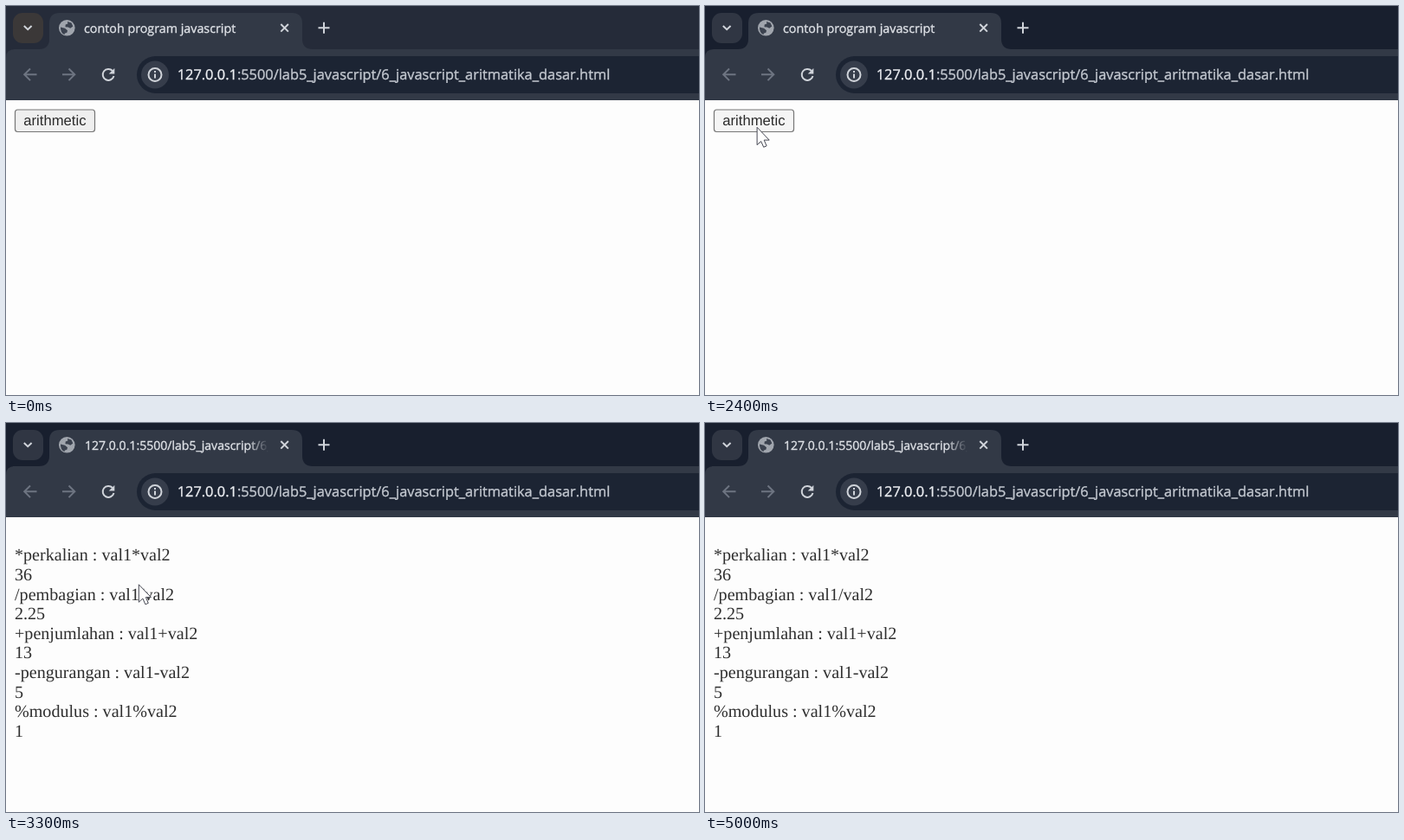
These frames come from a looping animation (800 px wide and 450 px high, 5100 ms). An HTML page:

```html
<!DOCTYPE html>
<html lang="id">
<head>
<meta charset="utf-8">
<title>contoh program javascript</title>
<style>
  html, body { margin: 0; width: 100%; height: 100%; overflow: hidden; background: #fdfdfd; }
  svg { display: block; width: 800px; height: 450px; }
  text { text-rendering: geometricPrecision; white-space: pre; }
  .ui { font-family: "Open Sans", "Noto Sans", sans-serif; fill: #dfe2e7; stroke: #dfe2e7; stroke-width: .35px; }
  .tab-title { font-size: 14.3px; }
  .long-title { font-size: 14.05px; }
  .url { font-size: 16.38px; fill: #c3c8d0; stroke: #c3c8d0; }
  .host { fill: #eceef2; stroke: #eceef2; }
  .button-label { font: 16.67px "Liberation Sans", Arial, sans-serif; fill: #2b2b2b; }
  .output { font: 20.1px "Liberation Serif", "Times New Roman", serif; fill: #2e2e2e; }
  .icon { fill: none; stroke: #d0d4da; stroke-width: 2; }
  .dim { stroke: #6d7481; }
</style>
</head>
<body>
<svg viewBox="0 0 800 450">
  <defs>
    <linearGradient id="fade" gradientUnits="userSpaceOnUse" x1="280" x2="303">
      <stop stop-color="#fff"/>
      <stop offset="1" stop-color="#000"/>
    </linearGradient>
    <mask id="titleMask" maskUnits="userSpaceOnUse" x="80" y="8" width="223" height="40">
      <rect x="80" y="8" width="223" height="40" fill="url(#fade)"/>
    </mask>
  </defs>

  <rect width="800" height="450" fill="#fdfdfd"/>

  <!-- tab strip -->
  <rect id="strip" width="800" height="64"/>
  <rect id="menu" x="8" y="8" width="35" height="35" rx="11"/>
  <path class="icon" d="M20.8 23l4.4 4.2 4.4-4.2"/>
  <path fill="#323946" d="M0 109V60Q0 50 10 50H38Q50 50 50 38V20Q50 8 62 8H330Q342 8 342 20V38Q342 50 354 50H800V109Z"/>
  <circle cx="70.3" cy="25.3" r="9.3" fill="#a0a5ad"/>
  <path fill="#3b424f" d="M63 24.5l5 1.2 3 2.6-.6 2.4-2.8 1 .2 1.6Q62.5 31 63 24.5ZM71 18l4.5 1.6 1.8 4-3 2.2-2.6-1.4-3.2-.2.2-2.6 2.6-1Z"/>
  <text class="ui tab-title" id="shortTitle" x="90" y="31.3">contoh program javascript</text>
  <g id="longTitle" mask="url(#titleMask)">
    <text class="ui tab-title long-title" x="91" y="31.3">127.0.0.1:5500/lab5_javascript/6_javascript</text>
  </g>
  <path class="icon" d="M317.3 21l8.6 8.6M325.9 21l-8.6 8.6M360.5 25.3h13M367 18.8v13"/>

  <!-- toolbar -->
  <path class="icon dim" d="M35.5 79.3H21.5M28 72.5l-6.8 6.8 6.8 6.8M65 79.3H79M72.5 72.5l6.8 6.8-6.8 6.8"/>
  <path class="icon" d="M123 75A6.5 6.5 0 1 0 124.5 81"/>
  <path fill="#d0d4da" d="M125.3 72v6.6h-6.6Z"/>
  <rect x="151" y="58" width="680" height="43" rx="21.5" fill="#1c2433"/>
  <circle cx="172" cy="79.5" r="16" fill="#363d4b"/>
  <circle class="icon" cx="172" cy="79.5" r="7.5"/>
  <path class="icon" d="M172 78.5v5M172 75v2"/>
  <text class="ui url" x="197.7" y="85.4"><tspan class="host">127.0.0.1</tspan>:5500/lab5_javascript/6_javascript_aritmatika_dasar.html</text>

  <!-- page -->
  <g id="form">
    <rect id="button" x="10.5" y="120" width="92" height="25.5" rx="3" stroke="#767676" stroke-width="1.2"/>
    <text class="button-label" x="20.3" y="138.3">arithmetic</text>
  </g>
  <g id="results"></g>

  <path id="cursor" d="M.6 .8V21.2L5.2 17 8.2 23.8 11.6 22.3 8.7 15.6H14.7Z" fill="#fff" stroke="#454752" stroke-linejoin="round"/>
</svg>
<script>
  const LOOP = 5100, STEP = 100;
  const FOCUS = 700, HOVER = 1800, PRESS = 2300, SUBMIT = 2600, LEAVE = 4400;

  const linear = u => u;
  const easeOut = u => 1 - (1 - u) ** 2.5;
  const easeInOut = u => u * u * (3 - 2 * u);

  // Pointer: enters, heads for the button, then drifts off the bottom edge
  const entry = { x: 493, y: 176 };
  const moves = [
    { start: 1100, end: 1200, x: 313, y: 168, ease: linear },
    { start: 1200, end: 1700, x: 73, y: 147, ease: easeOut },
    { start: 1700, end: 1900, x: 59.5, y: 139.5, ease: linear },
    { start: 3100, end: 3700, x: 419, y: 319, ease: easeInOut },
    { start: 3700, end: 3900, x: 469, y: 354, ease: easeOut },
    { start: 4200, end: 4300, x: 579, y: 429, ease: linear }
  ];

  function pointerAt(t) {
    let { x, y } = entry;
    for (const move of moves) {
      const u = Math.min(1, Math.max(0, (t - move.start) / (move.end - move.start)));
      x += (move.x - x) * move.ease(u);
      y += (move.y - y) * move.ease(u);
    }
    return [x, y];
  }

  const a = 9, b = 4;
  const operations = [
    ["*", "perkalian", a * b], ["/", "pembagian", a / b], ["+", "penjumlahan", a + b],
    ["-", "pengurangan", a - b], ["%", "modulus", a % b]
  ];

  const $ = id => document.getElementById(id);
  const show = (id, on) => $(id).setAttribute("visibility", on ? "visible" : "hidden");
  const fill = (id, color) => $(id).setAttribute("fill", color);

  operations
    .flatMap(([op, name, value]) => [`${op}${name} : val1${op}val2`, value])
    .forEach((line, i) => {
      const text = document.createElementNS("http://www.w3.org/2000/svg", "text");
      text.setAttribute("class", "output");
      text.setAttribute("x", 10);
      text.setAttribute("y", 159.4 + i * 22.6);
      text.textContent = line;
      $("results").append(text);
    });

  function draw() {
    const t = Math.floor(performance.now() % LOOP / STEP) * STEP;
    const focused = t >= FOCUS, submitted = t >= SUBMIT;
    $("cursor").setAttribute("transform", `translate(${pointerAt(t)})`);
    show("cursor", focused && t < LEAVE);
    fill("strip", focused ? "#181f2e" : "#252b39");
    fill("menu", focused ? "#303643" : "#3b3838");
    fill("button", t >= PRESS ? "#f5f5f5" : t >= HOVER ? "#e5e5e5" : "#efefef");
    show("form", !submitted);
    show("shortTitle", !submitted);
    show("longTitle", submitted);
    show("results", submitted);
    requestAnimationFrame(draw);
  }
  draw();
</script>
</body>
</html>
```
